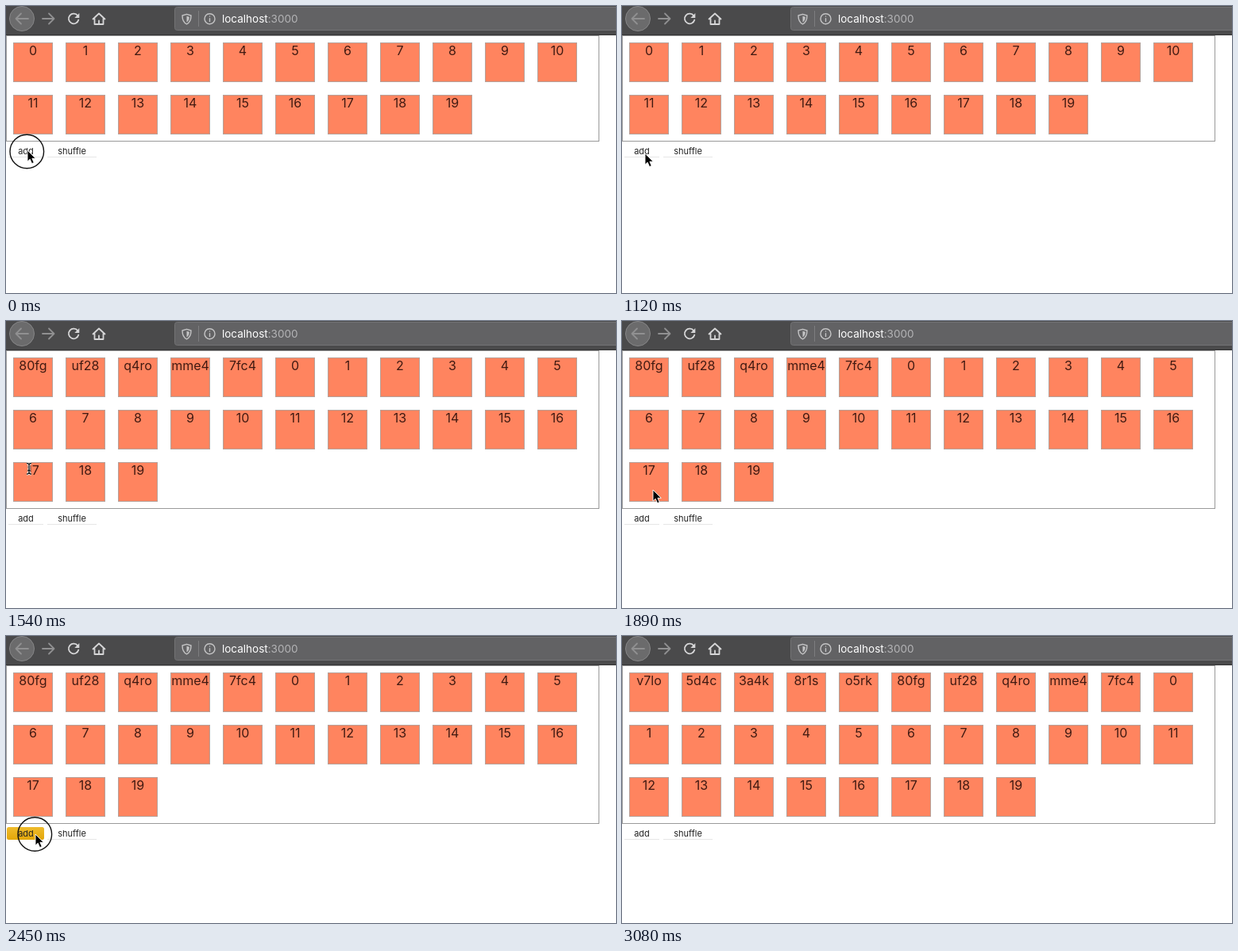
Animation of 768 by 362 pixels, one loop 3500 ms. Source, as an HTML page:

```html
<!DOCTYPE html>
<html lang="en">
<head>
<meta charset="utf-8">
<title>Tile list</title>
<style>
  html, body { margin: 0; width: 100%; height: 100%; overflow: hidden; background: #fff; }
  svg { display: block; width: 768px; height: 362px; font-family: Inter, "Open Sans", sans-serif; }
  .icon { fill: none; stroke: #d6d6d7; stroke-width: 1.8; stroke-linecap: round; stroke-linejoin: round; }
  .dim { stroke: #909091; }
  .thin { stroke: #c4c4c5; stroke-width: 1.4; }
  .url { font-size: 13.5px; fill: #b4b4b6; }
  .url .host { fill: #fff; }
  .tile rect { fill: #ff845f; stroke: #b5a19a; }
  .tile text { font-size: 16px; fill: #401a12; text-anchor: middle; }
  .label { font-size: 11px; fill: #222; text-anchor: middle; }
  .edge { stroke: #e6e6e6; }
</style>
</head>
<body>
<svg viewBox="0 0 768 362">
  <defs>
    <linearGradient id="gold" x1="0" y1="0" x2="0" y2="1">
      <stop offset="0" stop-color="#efbb2c"/>
      <stop offset="1" stop-color="#e2a609"/>
    </linearGradient>
  </defs>

  <rect width="768" height="37" fill="#4a4a4b"/>
  <rect y="36" width="768" height="1" fill="#343435"/>
  <rect x="212.5" y="1.5" width="570" height="29" rx="3" fill="#626264" stroke="#737375"/>
  <circle cx="20" cy="16" r="15.5" fill="#6b6b6c" stroke="#868687"/>
  <path class="icon dim" d="M28 16H12.5M19 9.500 12.500 16l6.500 6.500"/>
  <path class="icon dim" d="M46 16h14.500M54 9.500 60.500 16l-6.500 6.500"/>
  <path class="icon" d="M90.300 12.300A6.300 6.300 0 1 0 91.300 17.500"/>
  <path d="M92.300 9v6h-6z" fill="#d6d6d7"/>
  <path class="icon" d="M109.500 16.500 117 9.500l7.500 7M111.500 15.500v7.500h11v-7.500M117 23v-4.500"/>
  <path class="icon thin" d="M227.500 10.300 233 12c0 5.500-1.500 9-5.500 10.800-4-1.800-5.500-5.300-5.500-10.800z"/>
  <path d="M227.500 12.800 230.800 13.800c-.1 3.200-1 5.300-3.300 6.700z" fill="#c4c4c5"/>
  <path d="M242.500 6v20" stroke="#7d7d7f"/>
  <circle class="icon thin" cx="256.500" cy="16.200" r="6.500"/>
  <path class="icon thin" d="M256.500 15.700v3.800M256.500 12.900v.1"/>
  <text class="url" x="272" y="21"><tspan class="host">localhost</tspan>:3000</text>

  <rect id="frame" x=".5" y="37.500" width="746" fill="#fff" stroke="#9a9a9a"/>
  <g id="tiles"></g>

  <g id="buttons">
    <path class="edge" d="M3 190.500H47M52 190.500H114"/>
    <rect id="pressed" x="1" y="175" width="47" height="16" rx="2.500" fill="url(#gold)"/>
    <text class="label" x="25" y="186.500">add</text>
    <text class="label" x="83" y="186.500">shuffle</text>
  </g>

  <circle id="ring" r="21.300" fill="none" stroke="#111" stroke-width="1.400"/>
  <path id="arrow" d="M0 0V14.200L3.200 11.200 5.600 16.700 8.200 15.600 5.900 10.300H10.300Z" fill="#000" stroke="#fff" stroke-width=".9"/>
  <g id="beam" fill="none">
    <path d="M-3-6.500Q0-6.500 0-4.500 0-6.500 3-6.500M0-4.500V5M-3 7Q0 7 0 5 0 7 3 7M-1.800 2.500H1.800" stroke="#fff" stroke-width="3"/>
    <path d="M-3-6.500Q0-6.500 0-4.500 0-6.500 3-6.500M0-4.500V5M-3 7Q0 7 0 5 0 7 3 7M-1.800 2.500H1.800" stroke="#111" stroke-width="1.300"/>
  </g>
</svg>
<script>
  const LOOP = 3500, TICK = 70, COLS = 11, PITCH = 66;
  const $ = id => document.getElementById(id);
  const numbers = Array.from({ length: 20 }, (_, i) => String(i));
  const first = ['80fg', 'uf28', 'q4ro', 'mme4', '7fc4', ...numbers];
  const second = ['v7lo', '5d4c', '3a4k', '8r1s', 'o5rk', ...first];

  // Pointer path: time, x, y
  const path = [
    [0, 27, 182], [700, 27, 182], [910, 29, 186], [1540, 29, 186],
    [1890, 39, 213], [2100, 37, 250], [2800, 37, 250],
    [2870, 62, 258], [2940, 210, 292], [3010, 486, 346]
  ];

  function pointer(t) {
    const i = path.findIndex(p => p[0] > t);
    if (i < 0) return path[path.length - 1].slice(1);
    const [a, b] = [path[i - 1], path[i]];
    const k = (t - a[0]) / (b[0] - a[0]);
    return [a[1] + (b[1] - a[1]) * k, a[2] + (b[2] - a[2]) * k];
  }

  const show = (id, on) => $(id).setAttribute('visibility', on ? 'visible' : 'hidden');
  const move = (id, x, y) => $(id).setAttribute('transform', `translate(${x} ${y})`);

  let current;
  function layout(items) {
    if (items === current) return;
    current = items;
    const rows = Math.ceil(items.length / COLS);
    $('frame').setAttribute('height', rows * PITCH + 1);
    move('buttons', 0, (rows - 2) * PITCH);
    $('tiles').innerHTML = items.map((name, i) => {
      const x = 9 + i % COLS * PITCH, y = 46 + Math.floor(i / COLS) * PITCH;
      return `<g class="tile" transform="translate(${x} ${y})">
        <rect x=".5" y=".5" width="49" height="49"/><text x="25" y="16">${name}</text></g>`;
    }).join('');
  }

  function draw(now) {
    const t = Math.floor(now % LOOP / TICK) * TICK;
    const within = (a, b) => t >= a && t < b;
    const [x, y] = pointer(t);
    const text = within(1470, 1610);
    layout(t < 1540 ? numbers : t < 2520 ? first : second);
    show('pressed', within(1400, 1540) || within(2380, 2520));
    show('ring', t < 70 || within(1400, 1470) || within(2380, 2520));
    show('beam', text);
    show('arrow', !text && t < 3080);
    move('ring', x - .7, y + (t < 70 ? 1.5 : 0));
    move('beam', x, y);
    move('arrow', x, y);
  }

  function loop() {
    draw(performance.now());
    requestAnimationFrame(loop);
  }
  loop();
</script>
</body>
</html>
```
